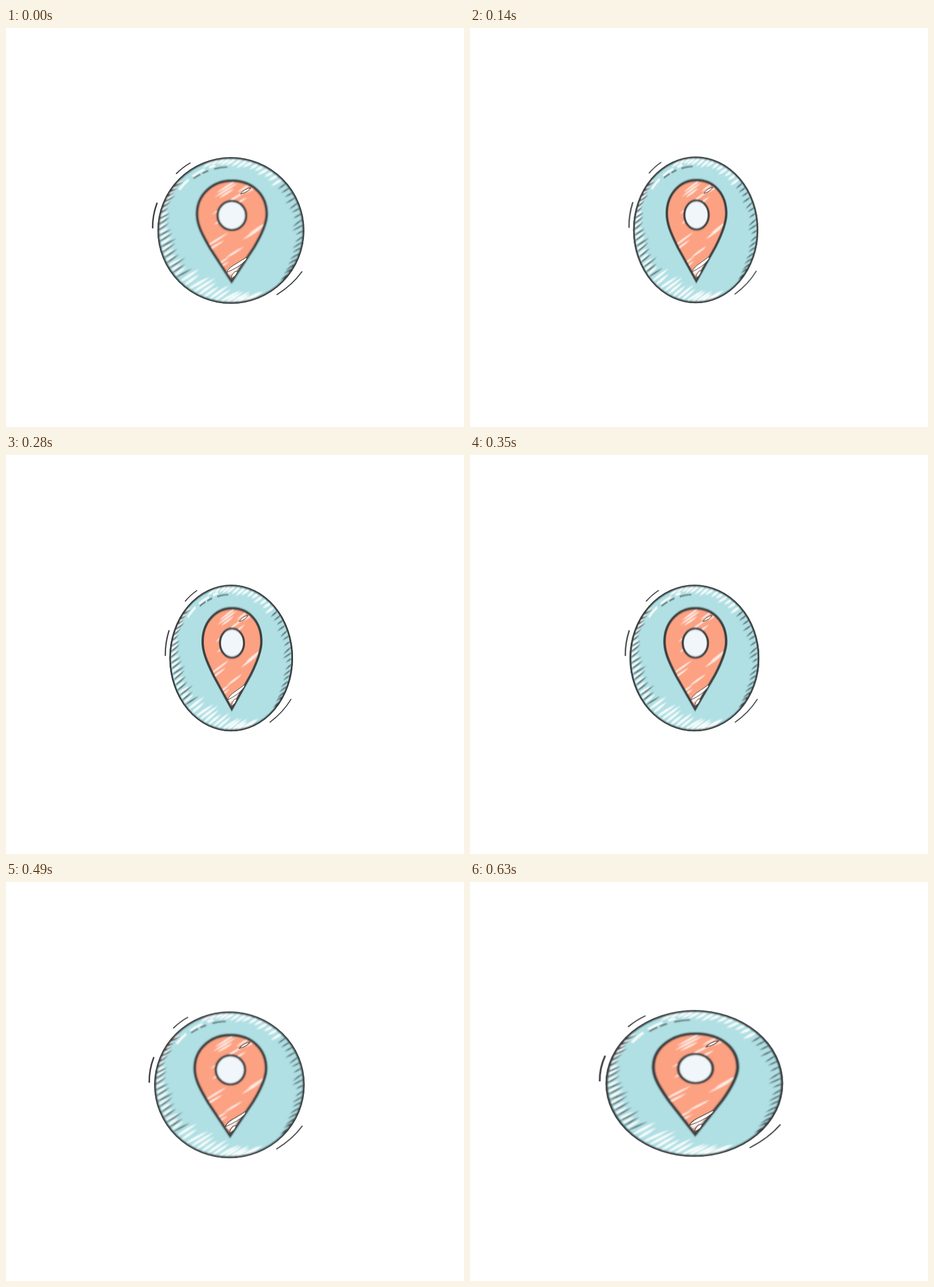
Write an HTML page that moves like this. It is 801x699 px and loops after 700 ms.

```html
<!DOCTYPE html>
<html lang="en">
<head>
<meta charset="utf-8">
<title>Map pin badge</title>
<style>
  html, body { margin: 0; width: 100%; height: 100%; overflow: hidden; background: #fff; }
  svg { display: block; width: 100%; height: 100%; }
  #badge { transform-box: view-box; transform-origin: 393.3px 354.7px; }
  .ink { fill: #34383a; }
  .line { fill: none; stroke: #3b3f41; }
  .chalk { fill: #f9fdfd; }
  .streak { fill: #fff1ea; }
</style>
</head>
<body>
<svg viewBox="0 0 801 699">
  <defs>
    <filter id="soft" x="-10%" y="-10%" width="120%" height="120%"><feGaussianBlur stdDeviation="0.9"/></filter>
    <clipPath id="disc"><circle cx="393.3" cy="354.7" r="128.4"/></clipPath>
    <path id="pin" d="M394.5 444 L357 386 C342 360 334 344 334 326 C334 291 362 267.5 395 267.5 C431 267.5 456 292 456 326 C456 342 447 362 434 384 Z"/>
    <clipPath id="pinClip"><use href="#pin"/></clipPath>
  </defs>
  <g id="badge">
    <g clip-path="url(#disc)">
      <g filter="url(#soft)">
        <circle cx="393.3" cy="354.7" r="130" fill="#b0e0e4"/>
        <g id="shade"></g>
        <path d="M303 283 A117 117 0 0 1 366 241" fill="none" stroke="#f9fdfd" stroke-width="4" stroke-dasharray="24 9"/>
        <path class="line" d="M328 263.5 A111 111 0 0 1 387 243.5" stroke-width="2.2" stroke-dasharray="14 4 11 11 30"/>
        <circle class="line" cx="393.3" cy="354.7" r="127.2" stroke-width="4.2"/>
        <use href="#pin" fill="#fca182"/>
        <g id="streaks" clip-path="url(#pinClip)"></g>
        <use href="#pin" class="line" stroke-width="4.8"/>
        <ellipse class="line" cx="395" cy="328.5" rx="25" ry="25.5" stroke-width="4.2" style="fill:#f1f6fa"/>
      </g>
    </g>
    <circle class="line" cx="393.3" cy="354.7" r="127.8" stroke-width="1.4"/>
    <g fill="#fff" stroke="#3a3230">
      <path d="M410 291 Q416 282 428 280 Q424 287 410 291 Z"/>
      <path d="M386 428 Q389 420 404 412 L420 402 Q423 403 418 408 Q408 419 386 428 Z"/>
      <path d="M394 439 Q394 432 400 427 Q406 425 404 429 Q402 435 394 439 Z"/>
    </g>
    <g class="line" stroke-width="2" stroke-linecap="round">
      <path d="M264 307 Q256 329 256.5 350" stroke-width="2.6"/>
      <path d="M298 255 Q309 244 322 236.5"/>
      <path d="M474 467 Q501 450 517.5 427"/>
    </g>
  </g>
</svg>
<script>
const CX = 393.3, CY = 354.7, R = 127;
const HATCH = -33;
const rad = deg => deg * Math.PI / 180;
const shade = document.getElementById('shade');
const streaks = document.getElementById('streaks');

let seed = 7;
const random = () => (seed = seed * 16807 % 2147483647) / 2147483647;
const between = (lo, hi) => lo + (hi - lo) * random();

// Tapered brush stroke; `bulge` places its widest point along the length.
function brush(parent, cls, x, y, dir, len, width, bulge) {
  const c = Math.cos(rad(dir)), s = Math.sin(rad(dir));
  const mx = x + c * len * bulge, my = y + s * len * bulge;
  const path = document.createElementNS('http://www.w3.org/2000/svg', 'path');
  path.setAttribute('class', cls);
  path.setAttribute('d', `M${x} ${y}Q${mx - s * width} ${my + c * width} ${x + c * len} ${y + s * len}` +
    `Q${mx + s * width} ${my - c * width} ${x} ${y}Z`);
  parent.append(path);
}

function rimStroke(cls, angle, len, width) {
  const a = rad(angle);
  const inward = Math.cos(a - rad(HATCH)) < 0 ? HATCH : HATCH + 180;
  brush(shade, cls, CX + R * Math.cos(a), CY + R * Math.sin(a), inward + between(-5, 5), len, width, 0.35);
}

// Rim shading: ink on the flanks, chalk above and below, none where the hatch runs along the rim.
for (let angle = 0; angle < 360; angle += 4.5) {
  const a = rad(angle), side = Math.cos(a);
  if (Math.abs(Math.cos(a - rad(HATCH))) < 0.33) continue;
  const len = (20 + 16 * Math.max(0, Math.cos(a - rad(125))) ** 2) * between(0.8, 1.15);
  if (Math.abs(side) < 0.71) {
    rimStroke('chalk', angle, len * 1.15, 4.5);
  } else {
    if (side < 0) rimStroke('chalk', angle + 2, len * 0.8, 4);
    rimStroke('ink', angle, len, 2.3);
  }
}

// Highlights across the pin, closest together at its two ends.
const ROWS = 22;
for (let i = 0; i < ROWS; i++) {
  const u = 2 * i / (ROWS - 1) - 1;
  const y = 354 + 78 * Math.sin(u * Math.PI / 2);
  const reach = 50 - 32 * Math.max(0, u);
  const len = between(26, 52);
  brush(streaks, 'streak', 395 + between(-reach, reach) - len * 0.42, y + len * 0.27, -32, len, 3.2, 0.5);
}

// Key poses [tenth of the loop, x, y, width]; the clock advances in ten held steps.
const keys = [
  [0, 0, 0, 1], [1, 0.5, 1, 0.904], [3, 2.3, -3, 0.801], [4, 0.5, 1, 0.842],
  [6, -2, 1, 0.926], [8, -3.2, 0.2, 1.123], [9, -1, -1.8, 1.209], [10, 0, 0, 1]
];
const frames = keys.map(([step, x, y, width]) => ({
  offset: step / 10,
  transform: `translate(${x}px, ${y}px) scale(${width}, 1)`
}));
document.getElementById('badge').animate(frames, { duration: 700, iterations: Infinity, easing: 'steps(10, end)' });
</script>
</body>
</html>
```
